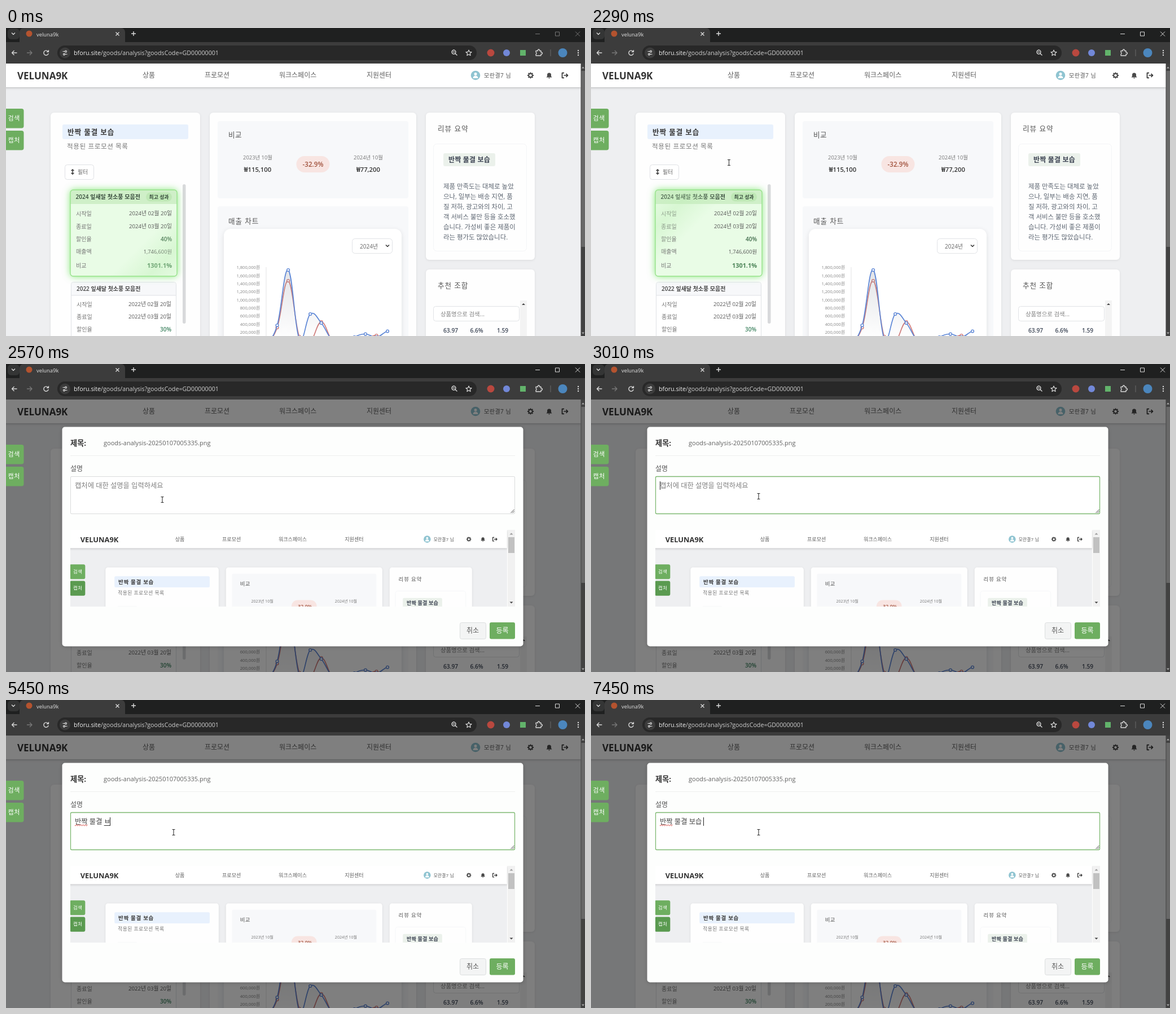
Recreate the animation shown at these times as an HTML page with a canvas. Size 1026 by 546 pixels, loop 8 s.

```html
<!DOCTYPE html>
<html lang="ko">
<head>
<meta charset="utf-8">
<title>veluna9k</title>
<style>
  html, body { margin: 0; width: 100%; height: 100%; overflow: hidden; background: #eeeff1; }
  canvas { display: block; }
</style>
</head>
<body>
<canvas id="stage" width="1026" height="546"></canvas>
<script>
const W = 1026, H = 546, LOOP = 8000;
const FONT = '"Open Sans","Noto Sans CJK KR","Noto Sans CJK",sans-serif';
const BRAND = 'VELUNA9K', USER = '모란결7 님', PRODUCT = '반짝 물결 보습', EVENT = '잎새달 첫소풍 모음전';
const GREEN = '#6eae60';
const stage = document.getElementById('stage').getContext('2d');
let g = stage;

// y is the visual middle of the text
function text(s, x, y, size, color, weight = 400, align = 'left', spacing = 0) {
  g.font = `${weight} ${size}px ${FONT}`;
  g.letterSpacing = spacing + 'px';
  g.textAlign = align;
  g.fillStyle = color;
  g.fillText(s, x, y + size * 0.36);
}

function box(x, y, w, h, r, fill, stroke, lw = 1) {
  g.beginPath();
  g.roundRect(x, y, w, h, r);
  if (fill) { g.fillStyle = fill; g.fill(); }
  if (stroke) { g.strokeStyle = stroke; g.lineWidth = lw; g.stroke(); }
}

function shadowBox(x, y, w, h, r, fill, blur, shade, dy = 1) {
  g.save();
  g.shadowColor = shade;
  g.shadowBlur = blur;
  g.shadowOffsetY = dy;
  box(x, y, w, h, r, fill);
  g.restore();
}

function disc(x, y, r, fill) {
  g.beginPath();
  g.arc(x, y, r, 0, 7);
  g.fillStyle = fill;
  g.fill();
}

// SVG path placed at x, y
function path(d, x, y, stroke, lw = 1.4, fill) {
  const p = new Path2D(d);
  g.save();
  g.translate(x, y);
  g.lineJoin = 'round';
  if (fill) { g.fillStyle = fill; g.fill(p); }
  if (stroke) { g.strokeStyle = stroke; g.lineWidth = lw; g.stroke(p); }
  g.restore();
}

function layer(draw) {
  const c = document.createElement('canvas');
  c.width = W;
  c.height = H;
  g = c.getContext('2d');
  draw();
  g = stage;
  return c;
}

function gear(x, y, color) {
  g.lineWidth = 2;
  g.strokeStyle = color;
  g.beginPath();
  for (let i = 0; i < 8; i++) {
    const a = i * Math.PI / 4, c = Math.cos(a), s = Math.sin(a);
    g.moveTo(x + 3 * c, y + 3 * s);
    g.lineTo(x + 5.6 * c, y + 5.6 * s);
  }
  g.moveTo(x + 3.3, y);
  g.arc(x, y, 3.3, 0, 7);
  g.stroke();
}

function chrome() {
  box(0, 0, W, 27, 0, '#1f2020');
  box(0, 25, W, 38, 0, '#3c3c3c');
  box(24, 0, 187, 30, [7, 7, 0, 0], '#3c3c3c');
  box(3, 1, 21, 19, 6, '#343535');
  path('M-3 -1.5L0 1.5L3 -1.5', 13, 10, '#ddd', 1.3);
  disc(41, 10, 5.5, '#b4532f');
  text('veluna9k', 54, 12, 9.4, '#e3e3e3');
  path('M-3 -3L3 3M3 -3L-3 3', 197.5, 10.5, '#ddd', 1.3);
  path('M-4 0H4M0 -4V4', 226, 10, '#ddd', 1.4);

  path('M5 0H-4M0 -4L-4 0L0 4', 14.5, 44, '#d8d8d8');
  path('M-5 0H4M0 -4L4 0L0 4', 42, 44, '#777');
  path('M3.6 -2.2A4.2 4.2 0 1 0 4.2 1M4.4 -5V-1.6H1', 71, 44, '#d8d8d8');
  box(91, 31, 743, 26, 13, '#282828');
  disc(104.5, 44, 9.5, '#3c3c3c');
  path('M-4 -2.5H0M3 -2.5A1.5 1.5 0 1 0 3 -2.4M-1 2.5H4M-3 2.5A1.5 1.5 0 1 1 -3 2.6', 104.5, 44, '#ddd', 1.2);
  const host = 'bforu.site';
  text(host, 120, 44, 10.7, '#f0f0f0');
  text('/goods/analysis?goodsCode=GD00000001', 120 + g.measureText(host).width, 44, 10.7, '#cfcfcf');
  path('M2.5 -1A3.5 3.5 0 1 0 2.5 -.9M1.5 1.8L5 5M-2.8 -1H.8', 794.5, 43.5, '#d8d8d8', 1.4);
  path('M0 -5L1.5 -1.6L5 -1.3L2.3 1.1L3.1 4.7L0 2.8L-3.1 4.7L-2.3 1.1L-5 -1.3L-1.5 -1.6Z', 820, 44, '#d8d8d8', 1.2);
  disc(859, 44, 6.5, '#b9483f');
  disc(887, 44, 6, '#7288d8');
  box(911, 39, 10, 10, 0, '#62b36b');
  path('M-5 -3.5H-1.5A1.7 1.7 0 1 1 1.5 -3.5H4V-.7A1.7 1.7 0 1 1 4 2.3V5H-5V2.4A1.8 1.8 0 0 0 -5 -1Z', 944, 44, '#d8d8d8', 1.3);
  box(964.5, 38, 1, 12, 0, '#6a6a6a');
  disc(986.5, 44, 8, '#4b86bd');
  for (const d of [-4, 0, 4]) disc(1014, 44 + d, 1.2, '#ddd');

  box(1018.5, 63, 7.5, 483, 0, '#424242');
  box(1019.5, 76, 6.5, 312, 0, '#686868');
  path('M-2.5 1.5L0 -1.5L2.5 1.5Z', 1022.5, 70, null, 0, '#aaa');
  path('M-2.5 -1.5L0 1.5L2.5 -1.5Z', 1022.5, 541, null, 0, '#aaa');
}

function windowButtons(active) {
  const c = active ? '#dedede' : '#777';
  path('M-4 0H4', 942, 10.5, c, 1);
  path('M-3.5 -3.5H3.5V3.5H-3.5Z', 977, 10.5, c, 1);
  path('M-4 -4L4 4M4 -4L-4 4', 1013, 10.5, c, 1);
}

function sideButtons(hover) {
  box(-5, 143, 36.5, 34.5, 4, GREEN);
  box(-5, 182, 36.5, 34.5, 4, hover ? '#5a9a50' : GREEN);
  text('검색', 14.3, 160, 11, '#fff', 400, 'center', 0.8);
  text('캡처', 14.3, 199, 11, '#fff', 400, 'center', 0.8);
}

function rows(list, x1, x2) {
  for (const [y, label, value, size = 9.7, color = '#555', weight = 400] of list) {
    text(label, x1, y, 10.1, '#777');
    text(value, x2, y, size, color, weight, 'right');
  }
}

function dates(year, y1, y2) {
  return [[y1, '시작일', year + '년 02월 20일'], [y2, '종료일', year + '년 03월 20일']];
}

function curve(pts, color, filled) {
  const at = i => pts[Math.max(0, Math.min(pts.length - 1, i))];
  const X = i => 461 + i * 19.55;
  const slope = i => (at(i + 1) - at(i - 1)) * 0.2;
  const trace = () => {
    g.beginPath();
    g.moveTo(X(0), pts[0]);
    for (let i = 1; i < pts.length; i++)
      g.bezierCurveTo(X(i - 1) + 7.8, at(i - 1) + slope(i - 1), X(i) - 7.8, at(i) - slope(i), X(i), at(i));
  };
  if (filled) {
    const fade = g.createLinearGradient(0, 424, 0, 553);
    fade.addColorStop(0, 'rgba(120,125,140,.22)');
    fade.addColorStop(1, 'rgba(120,125,140,0)');
    trace();
    g.lineTo(X(pts.length - 1), 570);
    g.lineTo(X(0), 570);
    g.fillStyle = fade;
    g.fill();
  }
  trace();
  g.strokeStyle = color;
  g.lineWidth = 1.7;
  g.stroke();
  pts.forEach((y, i) => {
    disc(X(i), y, 2.4, '#fff');
    g.lineWidth = 1.4;
    g.stroke();
  });
}

function header() {
  shadowBox(-10, 62, 1029, 43, 0, '#fff', 4, 'rgba(0,0,0,.25)');
  text(BRAND, 20, 85, 17, '#333', 700);
  [['상품', 242], ['프로모션', 352], ['워크스페이스', 484], ['지원센터', 639]]
    .forEach(([s, x]) => text(s, x, 84, 12, '#606060'));
  disc(832, 84, 8.3, '#8fc4d1');
  disc(832, 81.5, 2.5, '#fff');
  path('M-4.5 5.5A4.5 4.5 0 0 1 4.5 5.5Z', 832, 83.5, null, 0, '#fff');
  text(USER, 847, 84.5, 10, '#555', 400, 'left', 0.5);
  gear(929.5, 84, '#4a4a4a');
  path('M-5 3.5L-3.5 1.5V-1A3.5 3.5 0 0 1 3.5 -1V1.5L5 3.5ZM-1.5 4.3H1.5L0 6Z', 962.5, 84, null, 0, '#4a4a4a');
  path('M-1.5 -4.3H-5V4.3H-1.5M-2 0H5M2 -3L5 0L2 3', 990.5, 84, '#333', 1.7);
}

function page() {
  box(-10, 62, 1029, 484, 0, '#eeeff1');
  header();
  for (const [x, y, w, h] of [[79, 150, 265, 420], [361, 150, 366, 420], [744, 150, 193, 261], [744, 428, 193, 140]])
    shadowBox(x, y, w, h, 6, '#fefefe', 4, 'rgba(0,0,0,.09)');

  // promotions
  box(100, 171, 223, 26, 3, '#e8f1fd');
  text(PRODUCT, 109, 184, 12.6, '#3a3a3a', 700, 'left', 0.9);
  text('적용된 프로모션 목록', 108, 210, 11.6, '#777', 400, 'left', 0.6);
  box(104.5, 242.5, 51, 26, 4, '#fff', '#dfe1e5');
  path('M0 -4V4M-2.4 -1.8L0 -4.2L2.4 -1.8M-2.4 1.8L0 4.2L2.4 1.8', 118, 255, '#444', 1.5);
  text('필터', 127, 255, 9.8, '#666');
  box(313, 277, 5.5, 247, 3, '#d8d9db');
  box(115.5, 450.5, 186, 130, 4, '#fff', '#dfe2e6');
  box(116, 451, 185, 23, [4, 4, 0, 0], '#f7f8fa');
  box(116, 473.5, 185, 1, 0, '#dfe2e6');
  text('2022 ' + EVENT, 125, 462, 10, '#444', 600);
  rows([...dates(2022, 490, 512), [534, '할인율', '30%', 10, '#3f8461', 600]], 125, 293);

  // comparison
  box(375, 165, 338, 137, 4, '#f7f8fa');
  text('비교', 394, 189, 12.6, '#555', 400, 'left', 0.4);
  [[446, '2023년 10월', '₩115,100'], [642, '2024년 10월', '₩77,200']].forEach(([x, d, v]) => {
    text(d, x, 229.5, 9.4, '#777', 400, 'center');
    text(v, x, 250.5, 11.3, '#333', 600, 'center');
  });
  box(514.5, 227, 59, 29, 14.5, '#f8e5e2');
  text('-32.9%', 544, 242, 11.6, '#a2543f', 600, 'center');

  // sales chart
  box(375, 316, 338, 250, 4, '#f7f8fa');
  text('매출 차트', 394, 342, 12.6, '#555', 400, 'left', 0.9);
  shadowBox(386, 356, 315, 230, 12, '#fff', 9, 'rgba(0,0,0,.1)', 2);
  box(613.5, 373.5, 71, 26, 5, '#fff', '#e1e3e6');
  text('2024년', 627, 387, 10, '#666');
  path('M-3 -1.5L0 1.5L3 -1.5', 676, 386, '#333', 1.5);
  for (let i = 0; i < 9; i++)
    text((1800 - i * 200).toLocaleString('en-US') + ',000원', 450, 424.5 + i * 14.33, 7.7, '#858585', 400, 'right');
  box(460.5, 424, 1, 130, 0, '#e4e4e6');
  curve([556, 531, 448, 547, 556, 521, 555, 562, 558, 552, 545, 556], '#d17a78');
  curve([556, 527, 429, 551, 507, 523, 554, 562, 548, 542.5, 548, 537.5], '#5c86d6', true);

  // reviews
  text('리뷰 요약', 765, 178, 12.6, '#555', 400, 'left', 1);
  box(757.5, 205.5, 165, 190, 6, null, '#f4f5f7');
  box(775, 222, 92, 23, 3, '#ebf1eb');
  text(PRODUCT, 784, 234, 12, '#3c4352', 600, 'left', 0.2);
  ['제품 만족도는 대체로 높았', '으나, 일부는 배송 지연, 품', '질 저하, 광고와의 차이, 고',
    '객 서비스 불만 등을 호소했', '습니다. 가성비 좋은 제품이', '라는 평가도 많았습니다.']
    .forEach((s, i) => text(s, 775, 281 + i * 18, 11.45, '#5b6470'));

  // recommendations
  text('추천 조합', 765, 456, 12.6, '#555', 400, 'left', 0.9);
  box(911, 483, 12, 70, 0, '#f3f3f3');
  path('M-3 1.5L0 -1.5L3 1.5Z', 917, 489.5, null, 0, '#444');
  box(757.5, 493.5, 152, 26, 4, '#fff', '#e1e3e6');
  text('상품명으로 검색...', 770, 507, 10.4, '#808080');
  [['63.97', 788], ['6.6%', 834], ['1.59', 880]].forEach(([s, x]) => text(s, x, 536, 10.2, '#3d4656', 600, 'center'));
}

function bestCard(t) {
  const pulse = 0.85 + 0.15 * Math.cos(t * Math.PI / 1150);
  shadowBox(114, 287, 189, 153, 5, '#e9fce6', 13 * pulse, `rgba(125,230,112,${pulse})`, 0);
  box(114, 287, 189, 25, [5, 5, 0, 0], '#cfefc8');
  text('2024 ' + EVENT, 123.5, 299, 10.1, '#35493a', 600);
  box(248, 291.5, 46, 16, 8, '#bfe8b6');
  text('최고 성과', 271, 299.5, 8.9, '#35493a', 600, 'center');
  rows([...dates(2024, 329, 352), [374, '할인율', '40%', 10, '#3f6b4a', 600],
    [396.5, '매출액', '1,746,600원', 9.3], [421, '비교', '1301.1%', 10.9, '#4a8356', 700]], 124, 294);
  // tinted band crossing along the diagonal, above the text
  const p = ((t / 3400 + 0.675) % 1) * 2 - 0.5;
  const cx = 114 + 189 * p, cy = 287 + 153 * p;
  const band = g.createLinearGradient(cx - 34, cy - 34, cx + 34, cy + 34);
  band.addColorStop(0, 'rgba(190,238,182,0)');
  band.addColorStop(0.5, 'rgba(190,238,182,.4)');
  band.addColorStop(1, 'rgba(190,238,182,0)');
  box(114, 287, 189, 153, 5, band);
  box(114, 287, 189, 153, 5, null, '#98e38c', 1.4);
}

function modal() {
  shadowBox(99.5, 111.5, 817, 389, 5, '#fdfefd', 6, 'rgba(0,0,0,.2)');
  text('제목:', 114, 140, 13.2, '#333', 700);
  text('goods-analysis-20250107005335.png', 173, 140.5, 11, '#606060');
  box(114, 162, 788, 1, 0, '#eeefee');
  text('설명', 114, 185.5, 12, '#555');
  textarea(0);

  g.save();
  g.beginPath();
  g.rect(114, 294, 775, 136);
  g.clip();
  g.translate(116.5, 247.2);
  g.scale(0.757, 0.755);
  page();
  sideButtons(true);
  g.restore();
  box(889, 294, 13, 136, 0, '#f1f1f1');
  box(890, 307, 11, 28, 0, '#c1c1c1');
  path('M-3 1.5L0 -1.5L3 1.5Z', 895.5, 301, null, 0, '#999');
  path('M-3 -1.5L0 1.5L3 -1.5Z', 895.5, 423, null, 0, '#444');

  box(804.5, 458.5, 46, 29, 3, '#f3f4f4', '#dcdedf');
  text('취소', 827, 473, 12, '#555', 400, 'center');
  box(857, 458, 45, 29.5, 3, GREEN);
  text('등록', 879.5, 473, 12, '#fff', 400, 'center');
}

const TYPED = [[3460, 'ㅂ'], [3600, '바'], [3740, '반'], [4020, '반ㅉ'], [4170, '반짜'], [4310, '반짝'],
  [4460, '반짝 '], [4740, '반짝 ㅁ'], [5010, '반짝 물겨'], [5160, '반짝 물결 '], [5450, '반짝 물결 ㅂ'],
  [5590, '반짝 물결 보'], [5730, '반짝 물결 보스'], [6020, '반짝 물결 보습'], [6450, '반짝 물결 보습 ']];

function textarea(t) {
  const focus = t >= 3010, size = 12.3;
  box(114.5, 199.5, 787, 66, 2, '#fff', focus ? '#7db871' : '#dadcdc', focus ? 1.3 : 1);
  path('M-3 3L3 -3M0 3L3 0', 897.5, 261, '#444', 1);
  const value = TYPED.filter(s => s[0] <= t).map(s => s[1]).pop() || '';
  if (!value) text('캡처에 대한 설명을 입력하세요', 122, 216, size, '#808080');
  else text(value, 122, 216, size, '#444');
  const width = s => g.measureText(s).width;
  const end = 122 + (value ? width(value) : 0);
  if (value && !value.endsWith(' ')) {
    const w = width(value.slice(-1));
    box(end - w, 222, w, 1, 0, '#333');
  }
  if (t >= 4600) {
    const stop = 122 + width(value.slice(0, 2));
    g.beginPath();
    for (let x = 122; x <= stop; x += 0.5) g.lineTo(x, 222 + 1.2 * Math.sin((x - 122) * 1.6));
    g.strokeStyle = '#d9504a';
    g.lineWidth = 1;
    g.stroke();
  }
  if (focus && !(t >= 7020 && t < 7450)) box(Math.floor(end), 208, 1, 15, 0, '#222');
}

const MOVES = [[140, 790, 415], [1140, 12, 200], [1720, 12, 205], [2290, 244.5, 238.5],
  [2430, 276, 239], [2570, 277, 240.5], [2860, 297, 234.5]];

function cursor(t) {
  if (t < 140) return;
  let i = MOVES.findIndex(m => m[0] > t);
  if (i < 0) i = MOVES.length;
  const [t0, x0, y0] = MOVES[i - 1], [t1, x1, y1] = MOVES[i] || [t0 + 1, x0, y0];
  const k = Math.min(1, (t - t0) / (t1 - t0)), e = k * k * (3 - 2 * k);
  const x = x0 + (x1 - x0) * e, y = y0 + (y1 - y0) * e;
  if (t >= 2140) {
    path('M-2.5 -5H-.6L0 -4.4L.6 -5H2.5M0 -4.4V4.4M-2.5 5H-.6L0 4.4L.6 5H2.5', x, y, '#333', 1.1);
  } else {
    path('M0 0V12L2.8 9.4L4.6 13.4L6.4 12.6L4.7 8.7L8.6 8.6Z', x, y, '#333', 0.9, '#fff');
  }
}

function snap(t) {
  if (t >= 3010) return t;
  const at = n => Math.round(n * 100 / 7) * 10;
  let n = Math.ceil(t * 7 / 1000);
  while (at(n) > t) n--;
  return at(n);
}

const frameLayer = layer(chrome), pageLayer = layer(page), modalLayer = layer(modal);

function render(now) {
  const t = snap(now % LOOP);
  g = stage;
  g.clearRect(0, 0, W, H);
  g.drawImage(pageLayer, 0, 0);
  bestCard(t);
  if (t >= 2430) {
    const open = t >= 2570, dy = open ? 0 : 5.5;
    box(0, 62, 1019, 484, 0, `rgba(0,0,0,${open ? 0.5 : 0.38})`);
    // the panel's backing shows ahead of its contents
    if (!open) box(99.5, 111.5 + dy, 817, 389, 5, 'rgba(255,255,255,.22)');
    g.globalAlpha = open ? 1 : 0.55;
    g.drawImage(modalLayer, 0, dy);
    g.globalAlpha = 1;
    if (open) textarea(t);
  }
  sideButtons(t >= 1140 && t < 1860);
  g.drawImage(frameLayer, 0, 0);
  windowButtons(t >= 1290);
  cursor(t);
}

const start = performance.now();
function tick() {
  render(performance.now() - start);
  requestAnimationFrame(tick);
}
tick();
</script>
</body>
</html>
```
